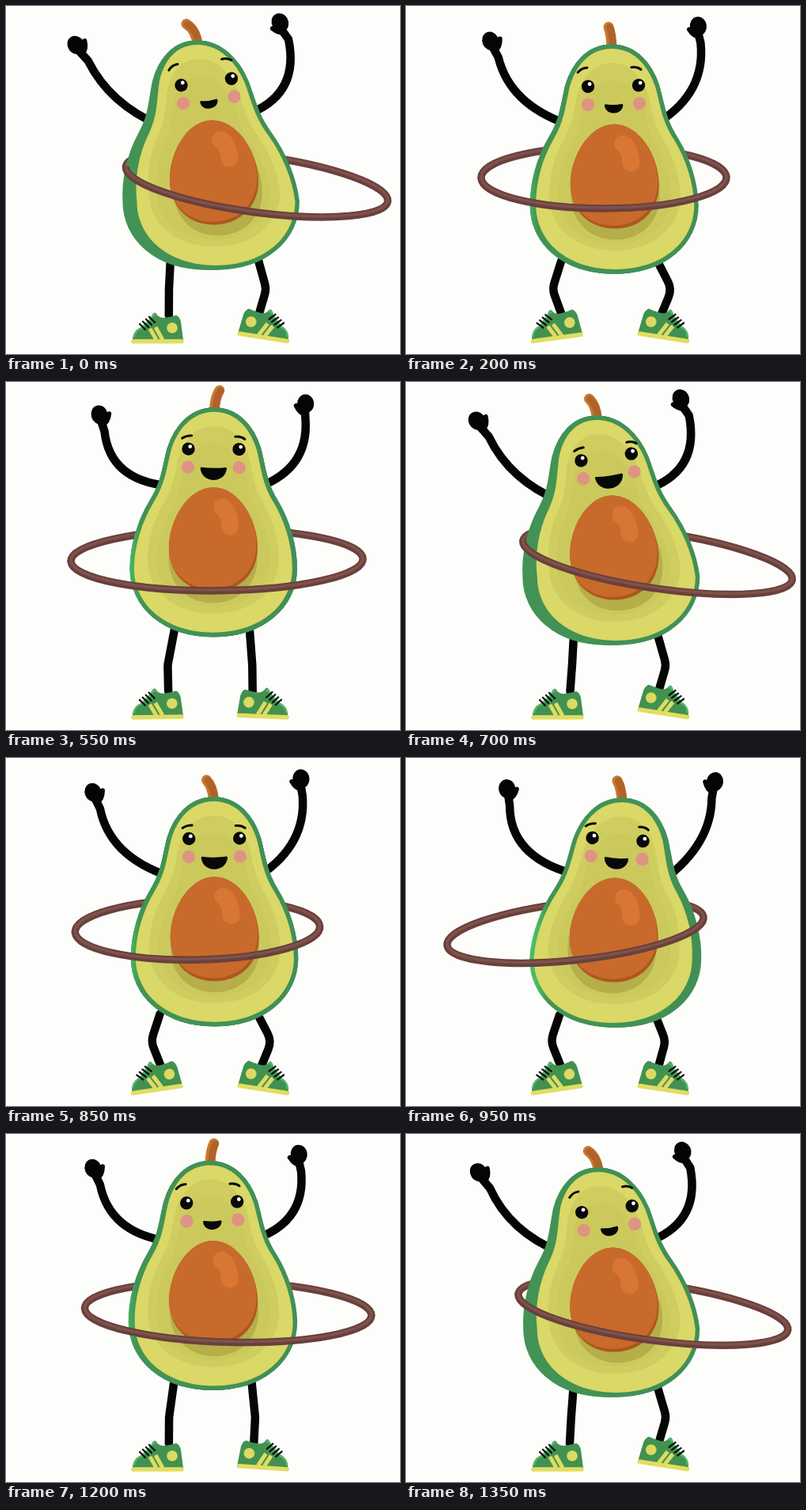
Animation, 498 px wide and 440 px high, one loop 1.4 s. Source, as an HTML page with a canvas:

```html
<!DOCTYPE html>
<html lang="en">
<head>
<meta charset="utf-8">
<title>Hula avocado</title>
<style>
  html, body { margin: 0; width: 100%; height: 100%; overflow: hidden; background: #fdfefc; }
  canvas { display: block; width: 498px; height: 440px; }
</style>
</head>
<body>
<canvas id="stage" width="498" height="440"></canvas>
<script>
const ctx = document.getElementById('stage').getContext('2d');
const LOOP = 1400, STEP = 50, SWING = 630;

// Each row: time in the swing, then the fields named below.
const FIELDS = ['top', 'y', 'low', 'handL', 'handR', 'hipL', 'kneeL', 'hipR', 'kneeR', 'hoopX', 'hoopY', 'hoopR', 'hoopTilt'];
const SWING_KEYS = [
  [0,   242, 43, 275, 91, 347, 208, 206, 318, 329, 317, 225, 167, 7.6],
  [88,  243, 42, 275, 94, 350, 212, 209, 317, 329, 313, 225, 172, 7.7],
  [200, 260, 48, 266, 109, 369, 196, 185, 318, 336, 250, 217, 155, 0],
  [320, 273, 50, 257, 129, 389, 194, 183, 315, 328, 214, 219, 163, -6.3],
  [450, 278, 39, 248, 155, 411, 212, 182, 299, 305, 195, 228, 186, -7.2],
  [470, 280, 36, 251, 149, 406, 214, 188, 300, 305, 209, 227, 186, -6.3],
  [555, 262, 32, 262, 118, 376, 214, 205, 308, 312, 270, 225, 184, 0]
];
const STEM_KEYS = [[0, -14], [200, -4], [450, 14], [575, 4], [700, -10], [950, -6], [1100, 2], [1225, 4], [1350, -13]];

// Smooth curve through keys that repeat after the given period.
function curve(keys, period, t, col) {
  const n = keys.length;
  const at = i => {
    const wrap = Math.floor(i / n), k = keys[i - wrap * n];
    return [k[0] + wrap * period, k[col]];
  };
  let i = 0;
  while (i < n - 1 && keys[i + 1][0] <= t) i++;
  const [p, a, b, q] = [at(i - 1), at(i), at(i + 1), at(i + 2)];
  const span = b[0] - a[0], u = (t - a[0]) / span;
  const m0 = (b[1] - p[1]) / (b[0] - p[0]) * span;
  const m1 = (q[1] - a[1]) / (q[0] - a[0]) * span;
  const u2 = u * u, u3 = u2 * u;
  return (2 * u3 - 3 * u2 + 1) * a[1] + (u3 - 2 * u2 + u) * m0 + (3 * u2 - 2 * u3) * b[1] + (u3 - u2) * m1;
}

const clamp = (v, lo, hi) => Math.min(hi, Math.max(lo, v));
const rad = deg => deg * Math.PI / 180;

const SEED = new Path2D('M0-66C32-66 56-25 56 10C56 44 32 66 0 66C-32 66-56 44-56 10C-56-25-32-66 0-66Z');
const SHOE = new Path2D('M1-5C1-13 6-19 12-21L24-33Q28-42 31-38Q34-32 42-33Q50-34 56-36Q60-35 62-28L65-5Z');

// Pear outline whose axis leans down to the belly, then drops straight.
function pear(lean) {
  const pt = (x, y) => `${x + lean * Math.min(y, 199) / 280} ${y} `;
  return new Path2D('M' + pt(0, 0) +
    'C' + pt(28, 0) + pt(46, 22) + pt(54, 48) +
    'C' + pt(61, 76) + pt(61, 90) + pt(76, 115) +
    'C' + pt(91, 140) + pt(100, 171) + pt(100, 199) +
    'C' + pt(100, 244) + pt(61, 280) + pt(0, 280) +
    'C' + pt(-61, 280) + pt(-100, 244) + pt(-100, 199) +
    'C' + pt(-100, 171) + pt(-91, 140) + pt(-76, 115) +
    'C' + pt(-61, 90) + pt(-61, 76) + pt(-54, 48) +
    'C' + pt(-46, 22) + pt(-28, 0) + pt(0, 0) + 'Z');
}

function group(draw) {
  ctx.save();
  draw();
  ctx.restore();
}

function fill(path, color) {
  ctx.fillStyle = color;
  ctx.fill(path);
}

function line(d, color, width, cap = 'round') {
  ctx.strokeStyle = color;
  ctx.lineWidth = width;
  ctx.lineCap = cap;
  ctx.lineJoin = 'round';
  ctx.stroke(new Path2D(d));
}

function dot(x, y, r, color, ry = r) {
  ctx.fillStyle = color;
  ctx.beginPath();
  ctx.ellipse(x, y, r, ry, 0, 0, 2 * Math.PI);
  ctx.fill();
}

function arm(sx, sy, ex, ey, hx, hy, wx, side) {
  const wy = hy + 18;
  line(`M${sx} ${sy}Q${ex} ${ey} ${wx} ${wy}L${hx} ${hy + 4}`, '#050505', 10.5);
  group(() => {
    ctx.translate(hx, hy);
    ctx.rotate(Math.atan2(hx - wx, wy - hy));
    dot(-side, -3, 10.5, '#050505', 12);
    line(`M0 10Q${side * 7} 9 ${side * 11} -1`, '#050505', 6);
  });
}

function arms(p) {
  const tilt = (p.top - p.low) * .25, axis = p.top + (p.low - p.top) * .33;
  const sy = p.y + 100;
  const ly = 51 - (p.handL - 92) * .25, ry = 24 + (p.handR - 347) * .21;
  arm(axis - 58, sy - tilt, 131, 124, p.handL, ly, p.handL + 13 - (p.handL - 90) * .28, 1);
  arm(axis + 58, sy + tilt, 371 + (p.handR - 347) * .36, 109, p.handR, ry, p.handR + 10 - (p.handR - 347) * .3, -1);
}

function leg(hipX, hipY, knee, ankle) {
  ctx.strokeStyle = '#050505';
  ctx.lineWidth = 10.5;
  ctx.lineCap = 'round';
  ctx.beginPath();
  ctx.moveTo(hipX, hipY);
  ctx.arcTo(knee, 358, ankle, 391, 24);
  ctx.lineTo(ankle, 391);
  ctx.stroke();
}

function shoe(x, dir, turn) {
  group(() => {
    ctx.translate(x, 427);
    ctx.scale(dir, 1);
    ctx.rotate(rad(turn));
    fill(SHOE, '#429150');
    line('M3-9C3-15 8-18 13-20L25-32Q28-39 30-36', '#55bd6e', 2);
    line('M23-19L31-5M30-21L39-5', '#dedb62', 5, 'butt');
    dot(51, -20, 6.8, '#dcda62');
    for (let i = 0; i < 4; i++) line(`M${10 + 4 * i} ${-25 - 3 * i}l7 7`, '#0a0d0a', 2.2);
    line('M2-3H63', '#e2dd62', 5.5);
  });
}

function legs(p) {
  const hip = p.y + 275;
  leg(p.hipL, hip, p.kneeL, 197 + (p.kneeL - 185) * .42);
  leg(p.hipR, hip, p.kneeR, 309 + (p.kneeR - 305) * .43);
  shoe(159, 1, clamp((p.kneeL - 206) * .37, -8.5, 0));
  shoe(357, -1, clamp((305 - p.kneeR) * .38, -9, 0));
}

function hoop(p, from, to) {
  const ring = (color, width, lift) => {
    ctx.strokeStyle = color;
    ctx.lineWidth = width;
    ctx.lineCap = 'butt';
    ctx.beginPath();
    ctx.ellipse(p.hoopX, p.hoopY - lift, p.hoopR, 39 - Math.abs(p.hoopTilt) * .42, rad(p.hoopTilt), from, to);
    ctx.stroke();
  };
  ring('#69403c', 9.5, 0);
  ring('#7e524b', 3.5, 1);
}

function stem(p, bend) {
  const tipY = p.y - 22 + Math.abs(bend) * .12;
  const d = `M${p.top} ${p.y + 5}Q${p.top + bend * .15} ${p.y - 13} ${p.top + bend} ${tipY}`;
  line(d, '#c9782e', 13);
  group(() => {
    ctx.translate(1.5, .5);
    line(d, '#b0622a', 9);
  });
}

function body(p) {
  const lean = p.low - p.top, depth = -lean * .42;
  const place = shift => {
    ctx.translate(p.top + shift, p.y + 6);
    ctx.scale(1, 279 / 280);
  };

  const green = ctx.createLinearGradient(-108, 0, 105, 0);
  green.addColorStop(0, '#4abb66');
  green.addColorStop(.07, '#429355');
  green.addColorStop(1, '#428f56');
  for (let i = 4; i >= 0; i--) group(() => {
    const d = depth * i / 4, shell = pear(lean + d * 1.2);
    place(d * .05);
    ctx.strokeStyle = ctx.fillStyle = green;
    ctx.lineWidth = 11;
    ctx.stroke(shell);
    ctx.fill(shell);
  });

  group(() => {
    const flesh = pear(lean);
    place(0);
    fill(flesh, '#dad866');
    ctx.translate(lean * .06, 18);
    ctx.scale(.83, .85);
    fill(flesh, '#cfcd5f');
    ctx.translate(lean * .06, 26);
    ctx.scale(.86, .87);
    fill(flesh, '#cbc95c');
  });

  group(() => {
    ctx.translate(p.top + lean * .62, p.y + 167.5);
    ctx.rotate(rad(-lean * .1));
    group(() => {
      ctx.translate(-depth * .3, 14);
      fill(SEED, '#b5ae49');
    });
    fill(SEED, '#ae571f');
    group(() => {
      ctx.clip(SEED);
      ctx.translate(-1.5, -4);
      fill(SEED, '#c86a2b');
    });
    line('M11-41Q20-36 21-17', '#da7634', 22);
  });
}

function brows(joy) {
  const rise = -25 + 11 * Math.sqrt(joy), slant = 4 - 3 * joy;
  const left = -39 + 6 * joy, right = 29 + 5 * joy;
  line(`M${left - 6} ${rise + slant}Q${left - 1} ${rise - 2} ${left + 6} ${rise - 2}`, '#0a0a0a', 3);
  line(`M${right - 6} ${rise - 1}Q${right + 1} ${rise - 2} ${right + 6} ${rise + 2}`, '#0a0a0a', 3);
}

function face(p, joy) {
  group(() => {
    ctx.translate(p.top + (p.low - p.top) * .34, p.y + 53);
    ctx.rotate(rad((p.top - p.low) * .23));
    for (const s of [-1, 1]) {
      dot(32 * s, 0, 8.2, '#080808');
      dot(32 * s + 2.2, -3, 2.4, '#fff');
      dot(32.5 * s, 23, 8.2, '#df9483');
    }
    brows(joy);
    const smile = 22 + 13 * joy, w = smile / 2;
    fill(new Path2D(`M${-w + 1} 23Q0 25 ${w - 1} 23Q${w + .5} 23 ${w} 26
      C${w * .8} ${23 + smile * .62} ${-w * .8} ${23 + smile * .62} ${-w} 26Q${-w - .5} 23 ${-w + 1} 23Z`), '#080808');
  });
}

function draw(t) {
  const p = {};
  FIELDS.forEach((name, i) => p[name] = curve(SWING_KEYS, SWING, t % SWING, i + 1));

  ctx.fillStyle = '#fdfefc';
  ctx.fillRect(0, 0, 498, 440);
  hoop(p, Math.PI, 2 * Math.PI);
  arms(p);
  legs(p);
  stem(p, curve(STEM_KEYS, LOOP, t, 1));
  body(p);
  face(p, Math.sin(Math.PI * t / LOOP) ** 3);
  hoop(p, -.02, Math.PI + .02);
}

const start = performance.now();
function tick() {
  const t = (performance.now() - start) % LOOP;
  draw(Math.floor(t / STEP) * STEP);
  requestAnimationFrame(tick);
}
tick();
</script>
</body>
</html>
```
